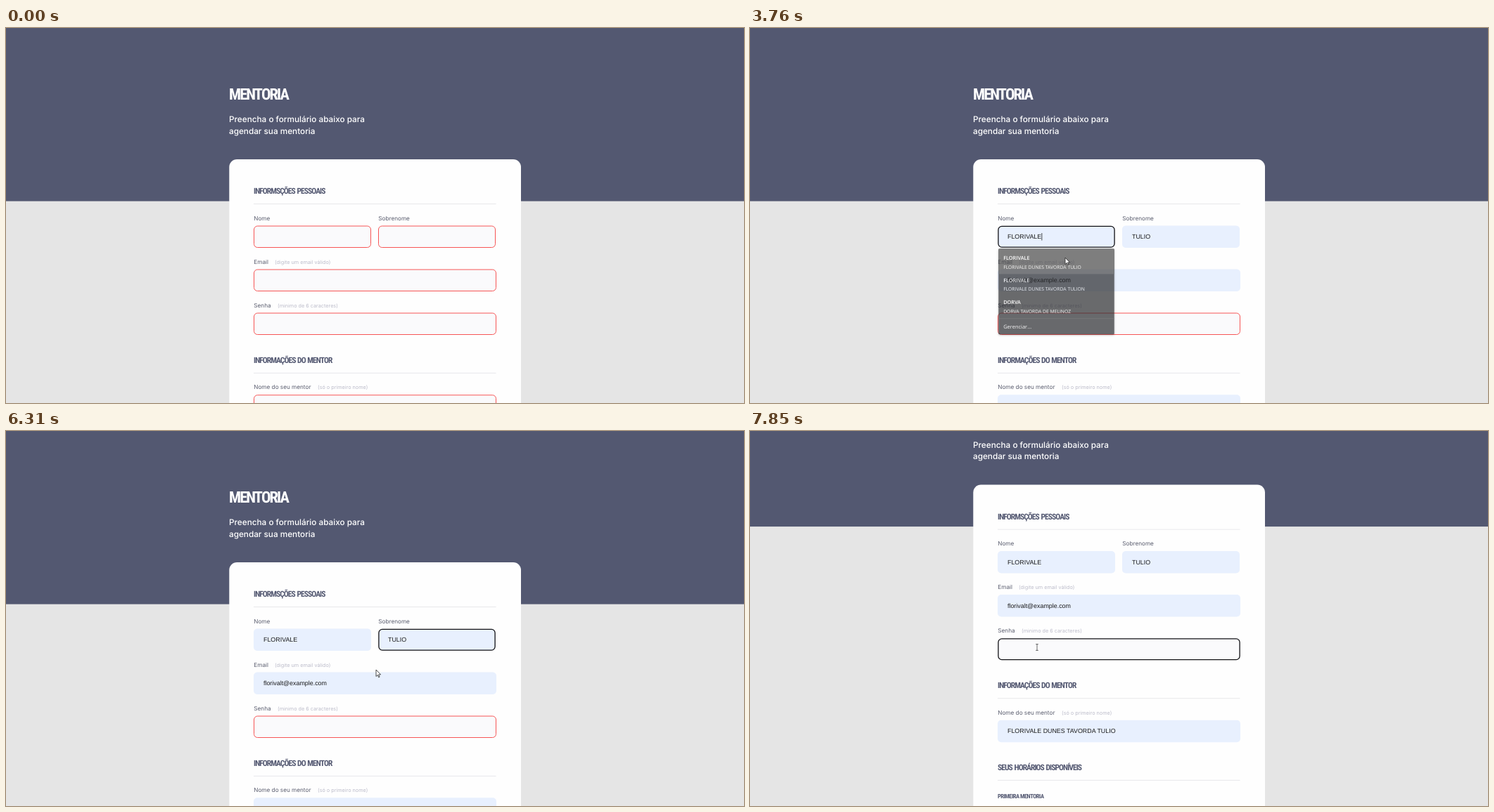
These frames come from a looping animation (1049x534 px, 8000 ms). An HTML page:

```html
<!DOCTYPE html>
<html lang="pt-BR">
<head>
<meta charset="utf-8">
<title>Mentoria</title>
<style>
  html, body { margin: 0; width: 100%; height: 100%; overflow: hidden; background: #e5e5e5; }
  svg { display: block; width: 1049px; height: 534px; }
  text { white-space: pre; text-rendering: geometricPrecision; }
  .title, .section, .sub { font-family: "Roboto Condensed", Roboto, sans-serif; font-weight: 700; fill: #535871; }
  .title { font-size: 22.5px; letter-spacing: -1.9px; fill: #fff; }
  .section { font-size: 11.5px; letter-spacing: -.95px; word-spacing: 1px; }
  .sub { font-size: 8.5px; letter-spacing: -.5px; }
  .lead { font: 500 11.75px Inter, sans-serif; fill: #fff; }
  .label { font: 400 8.2px Inter, sans-serif; fill: #5c5f70; }
  .hint { font: 400 7.25px Inter, sans-serif; fill: #bcbcca; }
  .value { font: 400 8.9px "Liberation Sans", Arial, sans-serif; fill: #1a1a1a; }
  .name { font: 600 7.4px "Open Sans", sans-serif; fill: #fff; }
  .full { font: 400 6.9px "Open Sans", sans-serif; fill: #f2f2f2; }
  .menu { font: 400 7.6px "Open Sans", sans-serif; fill: #f2f2f2; }
</style>
</head>
<body>
<svg id="stage" viewBox="0 0 1049 534"></svg>
<script>
const LOOP = 8000;
const FIRST = 'FLORIVALE', LAST = 'TULIO', FULL = 'FLORIVALE DUNES TAVORDA TULIO';

const fields = [
  { x: 352, y: 281.5, w: 167, value: FIRST, label: 'Nome' },
  { x: 529, y: 281.5, w: 167, value: LAST, label: 'Sobrenome' },
  { x: 352, y: 343.5, w: 345, value: 'florivalt@example.com', label: 'Email', hint: '(digite um email válido)', hintX: 382 },
  { x: 352, y: 405.5, w: 345, value: '', label: 'Senha', hint: '(minimo de 6 caracteres)', hintX: 386 },
  { x: 352, y: 522.25, w: 345, value: FULL, label: 'Nome do seu mentor', hint: '(só o primeiro nome)', hintX: 443 }
];

const popups = [
  { x: 352, h: 124, menus: [[428.5, 'Gerenciar...', 414]],
    rows: [[FIRST, FULL], [FIRST, FULL + 'N'], ['DORVA', 'DORVA TAVORDA DE MELINOZ']],
    open: [2850, 2970], close: [3700, 3900], hover: [3220, 3900] },
  { x: 529, h: 114, menus: [[396.5, 'Limpar formulário', 382], [419, 'Gerenciar...', 405]],
    rows: [[LAST, FULL], ['Tulion', 'Florivale Dunes Tavorda Tulion']],
    open: [4715, 4790], close: [5970, 6200], hover: [5230, 5620] }
];

const FILL_AT = 3220;
const focusSpans = [[2870, 4730, 0], [4730, 7310, 1], [7310, LOOP, 3]];
const caretSpans = [[2970, 3400, 0], [3690, 4300, 0], [5120, 5620, 1], [6500, 7000, 1], [7310, 7850, 3]];
const scrollSteps = [[0, 0], [6500, 14], [6560, 42], [6610, 58], [6650, 68], [6710, 110.5]];

// time, x, y, shape
const cursorPath = [
  [1210, 1042, 524, 'arrow'], [1280, 1028, 522, 'arrow'], [1540, 1028, 522, 'arrow'],
  [1700, 920, 462, 'arrow'], [1950, 680, 360, 'arrow'], [2150, 520, 302, 'ibeam'],
  [2320, 466, 299, 'ibeam'], [2370, 466, 299, 'ibeam'], [2430, 406, 298, 'ibeam'],
  [3220, 412, 306, 'arrow'], [3360, 448, 327, 'arrow'], [3830, 448, 327, 'arrow'],
  [4160, 548, 332, 'arrow'], [4300, 548, 332, 'ibeam'], [4430, 563, 298, 'ibeam'],
  [5120, 563, 298, 'ibeam'], [5230, 563, 318, 'arrow'], [5400, 560, 336, 'arrow'],
  [5820, 526, 340, 'arrow'], [6500, 526, 340, 'arrow'], [6600, 516, 343, 'ibeam'],
  [6650, 513, 345, 'ibeam'], [6710, 510, 345, 'ibeam'], [7090, 408, 308, 'ibeam']
];

const text = (cls, x, y, s) => `<text class="${cls}" x="${x}" y="${y}">${s}</text>`;
const rect = (x, y, w, h, attrs) => `<rect x="${x}" y="${y}" width="${w}" height="${h}" ${attrs}/>`;
const rule = (x, y, w, color) => rect(x, y, w, .8, `fill="${color}"`);
const section = (y, s) => text('section', 352, y + 4.2, s) + rule(352, y + 18.4, 344.5, '#e3e3e7');

const fieldMarkup = f =>
  text('label', f.x + .3, f.y - 8, f.label) +
  (f.hint ? text('hint', f.hintX, f.y - 8, f.hint) : '') +
  `<g class="field">${rect(f.x, f.y, f.w, 31.5, 'rx="5"')}${text('value', f.x + 14, f.y + 18.6, f.value)}` +
  `${rect(0, f.y + 10.5, .8, 10.5, 'fill="#222"')}</g>`;

const popupMarkup = p =>
  `<g class="popup">${rect(p.x, 313.3, 167, p.h, 'rx="1.5" fill="#292a2d" style="filter:drop-shadow(0 1px 1.5px #0006)"')}` +
  rect(p.x, 314, 167, 36, 'class="hover" fill="#474747"') +
  p.rows.map(([name, full], i) =>
    text('name', p.x + 7, 329.6 + 32 * i, name) + text('full', p.x + 7, 342.3 + 32 * i, full)).join('') +
  p.menus.map(([y, s, line]) => rule(p.x, line, 167, '#414246') + text('menu', p.x + 7, y, s)).join('') + '</g>';

const stage = document.getElementById('stage');
stage.innerHTML =
  rect(0, 0, 1049, 534, 'fill="#e5e5e5"') +
  '<g id="page">' +
    rect(0, 0, 1049, 246.6, 'fill="#535871"') +
    text('title', 317, 102.2, 'MENTORIA') +
    text('lead', 317, 134, 'Preencha o formulário abaixo para') +
    text('lead', 317, 150.5, 'agendar sua mentoria') +
    rect(317.3, 187, 414.7, 700, 'rx="11" fill="#fefefe"') +
    section(231.8, 'INFORMSÇÕES PESSOAIS') +
    section(472.5, 'INFORMAÇÕES DO MENTOR') +
    section(589, 'SEUS HORÁRIOS DISPONÍVEIS') +
    text('sub', 352, 633.5, 'PRIMEIRA MENTORIA') +
    fields.map(fieldMarkup).join('') +
  '</g>' +
  popups.map(popupMarkup).join('') +
  `<g id="cursor">
    <path id="arrow" d="M0 0V9.5L2.2 7.4 3.7 10.8 5.1 10.2 3.6 6.9H6.6Z" fill="#fff" stroke="#222" stroke-width=".8"/>
    <path id="ibeam" d="M-1.8-4.4H1.8M-1.8 4.4H1.8M0-4.4V4.4" fill="none" stroke="#444" stroke-width=".8"/>
  </g>`;

const byId = id => document.getElementById(id);
const page = byId('page'), cursor = byId('cursor');
const shapes = { arrow: byId('arrow'), ibeam: byId('ibeam') };
const fieldNodes = [...stage.querySelectorAll('.field')];
const popupNodes = [...stage.querySelectorAll('.popup')];

const within = (t, [from, to]) => t >= from && t < to;
const ramp = (t, [from, to]) => Math.min(1, Math.max(0, (t - from) / (to - from)));
const lastBefore = (t, table) => table.findLastIndex(row => row[0] <= t);
const show = (node, on) => node.setAttribute('visibility', on ? 'visible' : 'hidden');
const setAttrs = (node, attrs) => Object.entries(attrs).forEach(([k, v]) => node.setAttribute(k, v));

function drawField(f, i, t) {
  const [box, value, caret] = fieldNodes[i].children;
  const filled = f.value !== '' && t >= FILL_AT;
  const focused = focusSpans.some(s => s[2] === i && within(t, s));
  const inset = focused ? .9 : filled ? 0 : .5;
  setAttrs(box, {
    x: f.x + inset, y: f.y + inset, width: f.w - 2 * inset, height: 31.5 - 2 * inset,
    fill: filled ? '#e8f0fe' : '#fafafc',
    stroke: focused ? '#101014' : filled ? 'none' : '#f75555',
    'stroke-width': focused ? 1.3 : 1
  });
  show(value, filled);
  caret.setAttribute('x', f.x + 14.3 + (filled ? value.getComputedTextLength() : 0));
  show(caret, caretSpans.some(s => s[2] === i && within(t, s)));
}

function drawPopup(p, i, t) {
  const node = popupNodes[i];
  const opacity = ramp(t, p.open) * (1 - ramp(t, p.close));
  const scale = .95 + .05 * opacity;
  const cx = p.x + 83.5, cy = 313.3 + p.h / 2;
  setAttrs(node, { opacity, transform: `translate(${cx} ${cy}) scale(${scale}) translate(${-cx} ${-cy})` });
  node.setAttribute('display', opacity ? 'inline' : 'none');
  show(node.querySelector('.hover'), within(t, p.hover));
}

function drawCursor(t) {
  const i = lastBefore(t, cursorPath);
  cursor.setAttribute('display', i < 0 ? 'none' : 'inline');
  if (i < 0) return;
  const a = cursorPath[i], b = cursorPath[i + 1] || a;
  const k = a === b ? 0 : ramp(t, [a[0], b[0]]);
  const mix = n => a[n] + (b[n] - a[n]) * k;
  cursor.setAttribute('transform', `translate(${mix(1)} ${mix(2)})`);
  for (const name in shapes) show(shapes[name], name === a[3]);
}

function draw(t) {
  page.setAttribute('transform', `translate(0 ${-scrollSteps[lastBefore(t, scrollSteps)][1]})`);
  fields.forEach((f, i) => drawField(f, i, t));
  popups.forEach((p, i) => drawPopup(p, i, t));
  drawCursor(t);
}

const start = performance.now();
function frame() {
  draw((performance.now() - start) % LOOP);
  requestAnimationFrame(frame);
}
frame();
</script>
</body>
</html>
```
